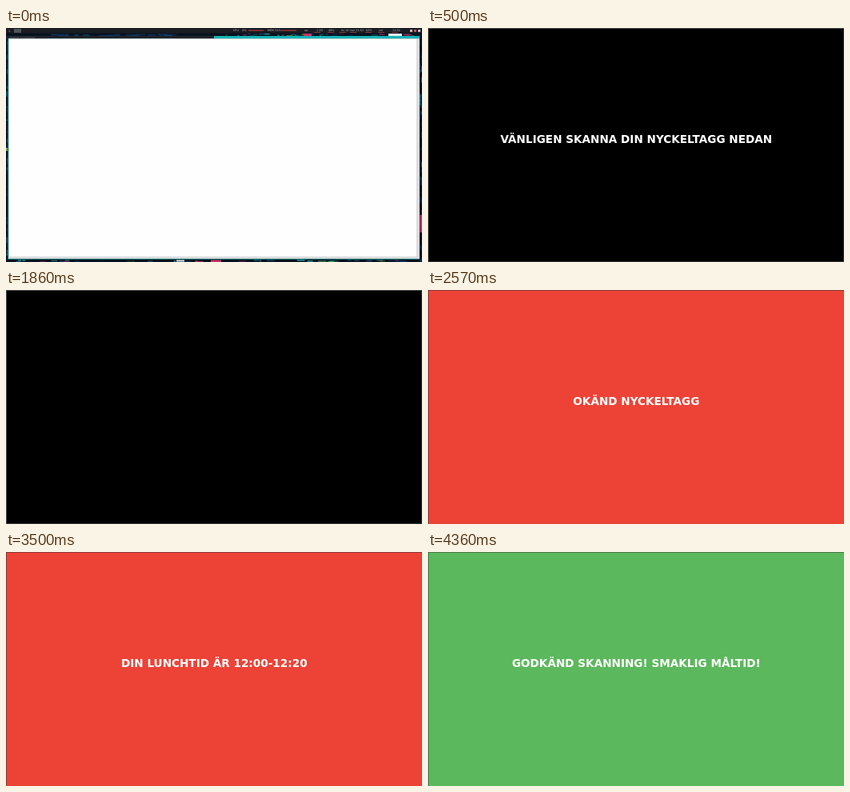
Animation of 520 by 293 pixels, one loop 4710 ms. Source, as an HTML page:

```html
<!DOCTYPE html>
<html lang="sv">
<head>
<meta charset="utf-8">
<title>Nyckeltagg</title>
<style>
html, body { margin: 0; width: 100%; height: 100%; overflow: hidden; background: #000; }
svg { display: block; width: 520px; height: 293px; }
#label { font: bold 13.6px "DejaVu Sans", sans-serif; fill: #fff; text-anchor: middle; }
.tiny { font: 3.4px "DejaVu Sans", sans-serif; fill: #b5b9bd; }
</style>
</head>
<body>
<svg viewBox="0 0 520 293">
  <g id="desktop"></g>
  <g id="screen">
    <rect id="fill" width="520" height="293"/>
    <path id="rim" fill="none" stroke-width="1" d="M0 .5H520M.5 0V293"/>
    <path id="far" fill="none" stroke="#303030" stroke-width="1" d="M519.5 1V293M1 292.5H520"/>
    <text id="label" x="260.3" y="143.8"></text>
  </g>
</svg>
<script>
const LOOP = 4710;
const BLACK = "#000", RED = "#ed4337", GREEN = "#5cb85c";
const scenes = [
  { at: 0 },
  { at: 70, color: BLACK, text: "" },
  { at: 140, color: BLACK, text: "VÄNLIGEN SKANNA DIN NYCKELTAGG NEDAN" },
  { at: 1860, color: BLACK, text: "" },
  { at: 1930, color: RED, text: "OKÄND NYCKELTAGG" },
  { at: 2930, color: RED, text: "DIN LUNCHTID ÄR 12:00-12:20" },
  { at: 3930, color: GREEN, text: "GODKÄND SKANNING! SMAKLIG MÅLTID!" }
];

const $ = id => document.getElementById(id);
const desktop = $("desktop");

function add(tag, attrs, text = "") {
  const el = document.createElementNS("http://www.w3.org/2000/svg", tag);
  for (const key in attrs) el.setAttribute(key, attrs[key]);
  el.textContent = text;
  desktop.append(el);
}
const box = (x, y, width, height, fill, opacity = 1) =>
  add("rect", { x, y, width, height, fill, opacity });

let seed = 17;
const rand = () => (seed = seed * 16807 % 2147483647) / 2147483647;

// Scattered wallpaper lights inside a strip
function specks(count, x, y, w, h, colors, long, tall) {
  for (let i = 0; i < count; i++) {
    box(x + rand() * w, y + rand() * h, 1 + rand() * long, 1 + rand() * tall,
      colors[Math.floor(rand() * colors.length)], 0.35 + rand() * 0.5);
  }
}

function buildDesktop() {
  const cool = ["#0d5f78", "#123e70", "#13858f", "#173056"];
  const bright = [...cool, "#25b7c0", "#c02e69", "#5f9f45"];
  box(0, 0, 520, 293, "#06121f");
  specks(45, 0, 14, 2, 276, cool, 1, 7);
  specks(45, 517, 14, 2, 276, cool, 1, 7);
  specks(50, 0, 290, 515, 2, bright, 9, 0.8);
  specks(30, 45, 7, 170, 2, ["#123e70", "#15517f"], 16, 0.5);
  specks(40, 270, 6.5, 245, 3, bright, 7, 1);
  box(517.5, 234, 2.5, 22, "#c63366");
  box(0, 150, 2, 4, "#68a43c");
  box(213, 290.5, 10, 2, "#d9e5e8");
  box(256, 290.5, 13, 2.5, "#c63366");
  box(478, 7, 17, 3, "#e6eef0");
  box(372, 7, 10, 3, "#c63366");

  box(0, 0, 520, 6.5, "#1b1d23");
  box(10, 1, 9, 5, "#50545b");
  add("text", { x: 3, y: 4.6, class: "tiny" }, "1");
  const meters = [[284, "CPU"], [295, "4%"], [327, "MEM 31%"], [373, "up"], [388, "1.2G"],
    [403, "48%"], [419, "tis 14 mar 11:52"], [450, "62%"], [466, "vol"], [483, "11:52"]];
  for (const [x, label] of meters) add("text", { x, y: 4.4, class: "tiny" }, label);
  for (const x of [303, 344]) box(x, 2.5, 19, 1.2, "#a33b3d");
  for (const x of [385, 402, 417, 430, 449, 465, 482]) box(x, 5, 8, 0.8, "#9a4148");
  for (const x of [505, 510, 515]) box(x, 2, 3, 3, x === 510 ? "#c75353" : "#b9bdc1");

  box(0, 10, 260, 3.5, "#20242b");
  add("text", { x: 4, y: 12.8, class: "tiny", opacity: 0.45 }, "skanna nyckeltagg");
  box(260, 10, 257, 3.5, "#16b4b5");
  box(2, 13, 515, 277, "#176c70");
  box(3, 13, 514, 276, "#b9cccb");
  box(4, 14, 509, 272.5, "#fefefe");
  box(513, 14, 3.5, 274, "#dcdcdc");
  box(4, 286.5, 512, 2, "#dcdcdc");
}

let current;
function draw(time) {
  const t = time % LOOP;
  const scene = scenes.findLast(s => s.at <= t);
  if (scene === current) return;
  current = scene;
  const live = Boolean(scene.color);
  desktop.style.display = live ? "none" : "";
  $("screen").style.display = live ? "" : "none";
  if (!live) return;
  $("fill").setAttribute("fill", scene.color);
  $("rim").setAttribute("stroke", scene.color === BLACK ? "#4a4a4a" : scene.color === RED ? "#8b3b34" : "#48784a");
  $("far").style.display = scene.color === BLACK ? "" : "none";
  $("label").textContent = scene.text;
}

buildDesktop();
const start = performance.now();
function tick() {
  draw(performance.now() - start);
  requestAnimationFrame(tick);
}
tick();
</script>
</body>
</html>
```
